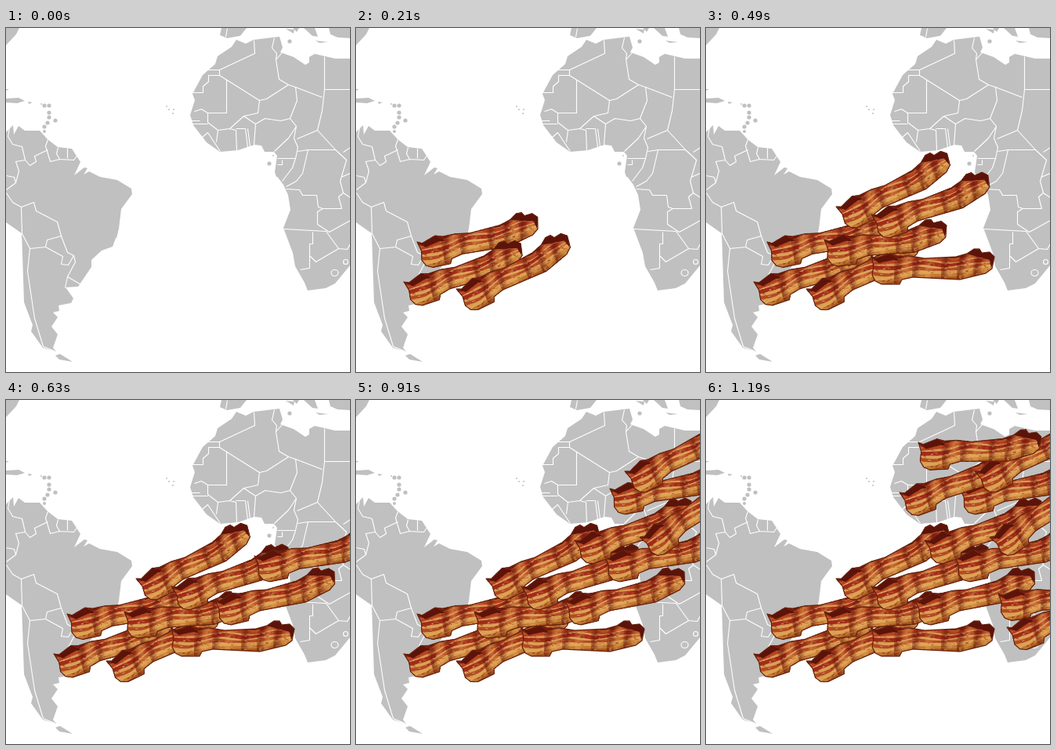
Animation of 439 by 439 pixels, one loop 1.39 s. Source, as an HTML page with a canvas:

```html
<!DOCTYPE html>
<html lang="en">
<head>
<meta charset="utf-8">
<title>Bacon crossing</title>
<style>
  html, body { margin: 0; width: 100%; height: 100%; overflow: hidden; background: #fff; }
  svg, canvas { position: absolute; left: 0; top: 0; width: 439px; height: 439px; }
  .land { fill: #c0c0c0; }
  .border { fill: none; stroke: #fff; stroke-width: 1.1; stroke-linejoin: round; }
</style>
</head>
<body>
<svg viewBox="0 0 439 439">
  <g class="land">
    <!-- South America, north and south -->
    <path d="M0 133 9 124 10 136 16 125 24 131 43 131 53 142 66 152 84 154 95 171 87 188 100 178 104 179 99 187 106 183 120 190 142 194 160 205 161 212 147 231 144 256 141 268 20 268V262L0 248Z"/>
    <path d="M20 260H143L136 279 122 284 109 296V305L92 330 76 331 86 345 83 351 67 354 68 361 60 363 66 369 58 381 66 391 60 408 64 413 47 408 32 387 34 379 23 350Z"/>
    <path d="M63 418 69 416 85 426 68 423Z"/>
    <!-- North America and islands -->
    <path d="M0 0H17L13 8 0 22ZM0 78H4L0 80ZM0 90 16 89 24 93 14 96 0 95ZM28 94 34 95 29 97Z"/>
    <!-- Africa, north and south -->
    <path d="M294 15 306 20 316 15 349 11 353 25 350 31 367 37 382 47 387 44V37L394 33 420 39 439 39V190H345L343 184 346 163 342 158 330 158 326 150 317 149 296 156 273 158 256 146 239 124 235 111 241 92 238 84 251 60 267 46 270 36 288 24Z"/>
    <path d="M345 188H439V303L420 326 408 332 385 335 381 325 369 304 366 287 354 255 363 232 360 213 354 200Z"/>
    <!-- Southern Europe -->
    <path d="M275 0 273 9 282 13 299 10 307 0ZM357 1 368 2 367 7ZM366 0H374L371 5ZM380 0H394L398 11 391 10ZM395 16 411 18 400 19ZM412 0H439V13L423 12 414 8Z"/>
  </g>
  <g class="land" id="dots"></g>
  <g class="border" transform="translate(.5 .5)">
    <path d="M20 262 30 281 27 310 36 370 47 406 62 412M0 210 8 222 19 228 35 222 38 233 65 247 70 265 52 270 50 279 30 281M19 228 20 262M0 188 10 190 12 197 0 206"/>
    <path d="M12 197 16 182 12 170 24 168 30 175 38 170 36 163 53 155M4 127 2 138 8 148 20 151 24 168M53 142 50 150 56 170 68 167 86 168 92 160M66 152 64 160 68 167M78 153V166"/>
    <path d="M50 279 72 291 70 301 79 302 86 290 78 286 70 265M86 290 88 298 78 317 97 328M78 317 75 331"/>
    <path d="M316 15 317 32 272 53V60H258V68L251 74V82H238M253 53H272M272 60 323 92 332 90 360 72 348 65 344 40 345 32 339 25 342 12M344 40 352 31M281 65V108H257L249 103 240 106"/>
    <path d="M360 72 369 75 403 88M406 36V78H439M406 78 403 105 397 130M369 75 371 92 362 115 350 118 330 115 318 122M362 115 370 125 360 140 342 157M370 125 367 140 372 152 369 166H346"/>
    <path d="M371 141 397 130 420 155H385L372 157M385 155 378 185 370 195 357 202M346 174H352V168M369 166 365 178 352 195M357 205 374 206 378 213 396 213 398 228 404 230"/>
    <path d="M404 230 397 234V250L412 260 439 245M354 256 408 259 424 281 435 282 439 275M391 260V275H387V306L375 308M387 290 395 298 424 281"/>
    <path d="M420 155 434 168 426 195 430 210 424 215 428 230 404 230M430 158 439 152M427 190 439 185M430 210 439 216"/>
    <path d="M323 92 321 108 303 112 285 128 270 130 257 120V108M236 118H247M237 122H257M250 139 257 133 273 157M270 130 268 145M285 128 293 130 294 156M293 128H305L308 152M308 128 311 151M303 112 318 122 316 149M282 0 280 11"/>
    <ellipse cx="419" cy="312" rx="4.5" ry="4"/>
    <circle cx="433" cy="298" r="3"/>
  </g>
</svg>
<canvas id="stage" width="439" height="439"></canvas>
<script>
const LOOP = 1390, STEP = 70;
const ctx = document.getElementById('stage').getContext('2d');

const dots = [[49, 99], [55, 99], [55, 108], [55, 114], [53, 121], [49, 126], [63, 118],
  [336, 173], [362, 17], [49, 132, 2], [45, 97, 1], [341, 163, 1],
  [205, 100, 1], [208, 104, 1], [214, 104, 1], [213, 109, 1]];
document.getElementById('dots').innerHTML =
  dots.map(([x, y, r = 2.6]) => `<circle cx="${x}" cy="${y}" r="${r}"/>`).join('');

// left corner x, y and angle, from bottom to top; a fourth value overrides the turn
const strips = [
  [78, 273, -12], [61, 324, -18.5], [128, 333, -26], [151, 270, -7],
  [211, 291, 0], [166, 228, -26], [211, 238, -19], [266, 255, -13.5],
  [317, 199, -11], [279, 179, -19], [362, 175, -35], [324, 113, -11],
  [247, 118, -20, 14], [343, 91, -27, 13], [271, 54, -3], [373, 247, -6], [384, 290, -22]
];

let seed = 7;
const rnd = () => (seed = seed * 16807 % 2147483647) / 2147483647;

function makeBacon() {
  const c = document.createElement('canvas');
  c.width = 340;
  c.height = 110;
  const g = c.getContext('2d');
  g.scale(2, 2);
  g.translate(5, 13);
  const shape = new Path2D('M0 0L6 3 24 -3 33 0 50 0 68 3 108 1 122 -3 131 -9 138 -9 141 -4 151 -5 157 1 154 16 146 22 113 30 53 27 39 30 36 36 13 36 5 32 1 24 3 12Z');
  g.save();
  g.clip(shape);

  const base = g.createLinearGradient(0, -6, 4, 36);
  ['#8a2a14', '#a93c1b', '#bd642b', '#cf8a43', '#d99a50', '#a4551f']
    .forEach((col, i) => base.addColorStop(i / 5, col));
  g.fillStyle = base;
  g.fillRect(-5, -13, 170, 55);

  // lengthwise bands of meat and fat
  const edge = (x, t) => 2 * Math.sin(x / 13) - x * .025 + t * (35 - x * .07);
  const band = (t, width, col) => {
    g.beginPath();
    for (let x = -4; x < 162; x += 3) g.lineTo(x, edge(x, t + .03 * Math.sin(x / 9 + t * 8)));
    g.lineWidth = width;
    g.strokeStyle = col;
    g.stroke();
  };
  band(.06, 5, '#7b1d10');
  band(.22, 4, '#b4431f');
  band(.33, 2, '#dc9a5c');
  band(.43, 5, '#a12c18');
  band(.55, 2.5, '#dda05a');
  band(.65, 4, '#b24a22');
  band(.78, 4, '#dda253');
  band(.92, 3, '#c47a33');

  // crosswise folds
  const fold = (x, w, rgb, a) => {
    const f = g.createLinearGradient(x - w, 0, x + w, 3);
    f.addColorStop(0, `rgba(${rgb},0)`);
    f.addColorStop(.5, `rgba(${rgb},${a})`);
    f.addColorStop(1, `rgba(${rgb},0)`);
    g.fillStyle = f;
    g.fillRect(x - w, -13, w * 2, 55);
  };
  for (const x of [36, 59, 96, 116, 137]) fold(x, 7, '105,20,8', .6);
  for (const x of [47, 76, 126, 149]) fold(x, 8, '230,165,85', .5);

  // crisp grain
  const grain = ['#6b160b', '#8e2a14', '#e8b36b', '#c9752f', '#f3d4a4'];
  for (let i = 0; i < 520; i++) {
    g.globalAlpha = .2 + rnd() * .35;
    g.fillStyle = grain[Math.floor(rnd() * 5)];
    g.fillRect(rnd() * 158, -9 + rnd() * 46, 1 + rnd() * 3, .6 + rnd());
  }
  g.globalAlpha = 1;

  // curled dark ends
  g.fillStyle = '#5c130a';
  g.fill(new Path2D('M0 -1L6 3 25 -3 36 7 28 5 9 9Z'));
  g.fill(new Path2D('M122 -3L131 -9 151 -5 158 1 153 15 151 5 132 0Z'));
  g.restore();

  g.lineWidth = 1.2;
  g.strokeStyle = '#64200d';
  g.lineJoin = 'round';
  g.stroke(shape);
  return c;
}

const bacon = makeBacon();

function frame() {
  const shown = Math.min(strips.length, Math.floor(performance.now() % LOOP / STEP));
  ctx.clearRect(0, 0, 439, 439);
  strips.forEach(([x, y, deg, turn], i) => {
    if ((turn || i + 1) > shown) return;
    ctx.save();
    ctx.translate(x, y);
    ctx.rotate(deg * Math.PI / 180);
    ctx.drawImage(bacon, -5, -13, 170, 55);
    ctx.restore();
  });
  requestAnimationFrame(frame);
}
frame();
</script>
</body>
</html>
```
